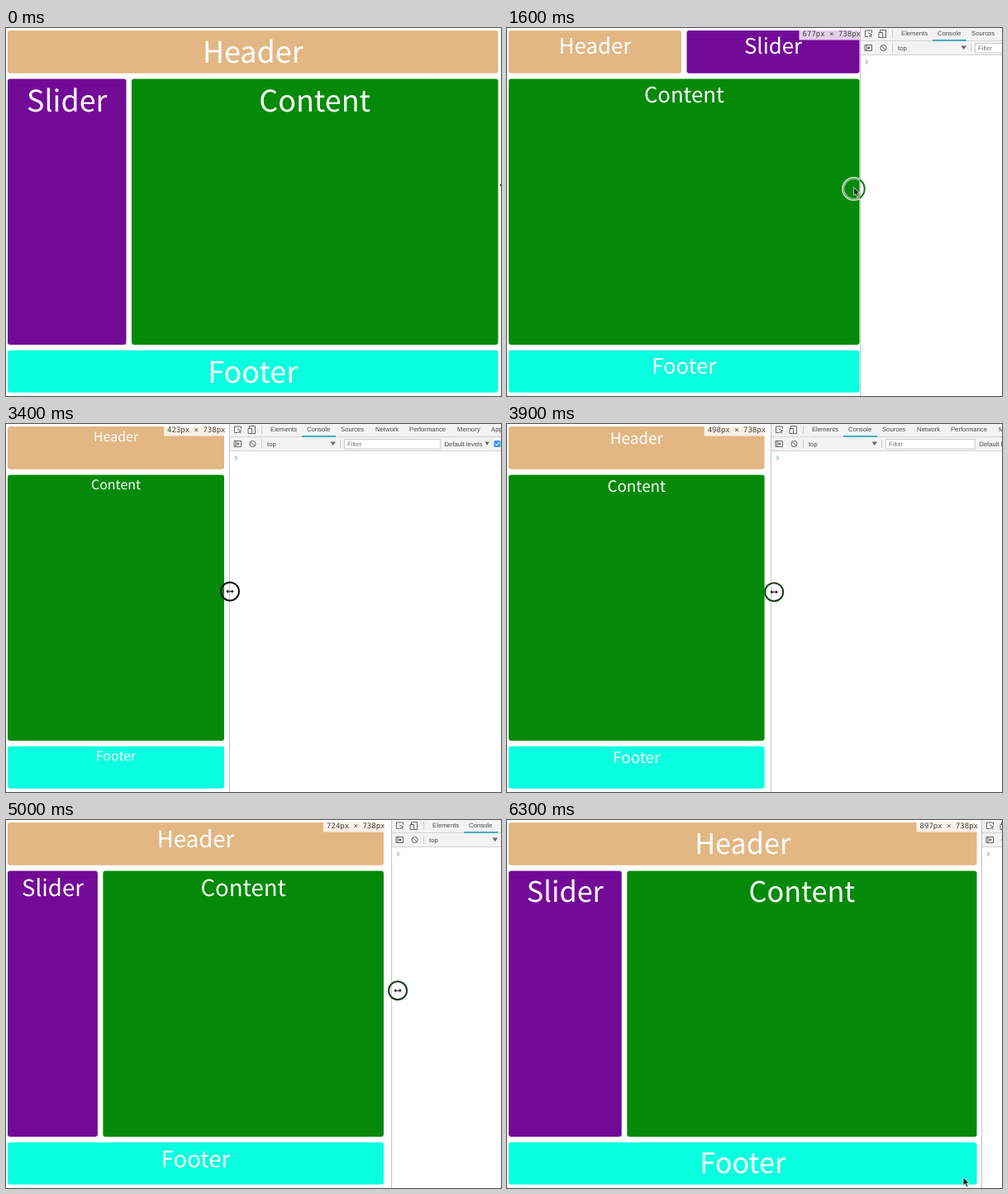
These frames come from a looping animation (599 by 445 pixels, 6.4 s). An HTML page:

```html
<!DOCTYPE html>
<html lang="en">
<head>
<meta charset="utf-8">
<title>Responsive layout</title>
<style>
  html, body { margin: 0; width: 100%; height: 100%; overflow: hidden; background: #fff; }
  svg { display: block; }
  text { text-rendering: geometricPrecision; white-space: pre; }
  .box text { font-family: "Noto Sans CJK SC", "Noto Sans CJK JP", "Noto Sans", sans-serif; fill: #fff; text-anchor: middle; }
  #size text { font: 9px "DejaVu Sans Mono", monospace; fill: #444; text-anchor: end; }
  #tools text { font: 7.7px "Liberation Sans", Arial, sans-serif; fill: #4a4a4a; }
  .line { fill: none; stroke: #666; stroke-width: 1; }
  .sep { stroke: #ccc; stroke-width: 1; }
  .ring { fill: none; }
</style>
</head>
<body>
<svg id="stage" width="599" height="445" viewBox="0 0 599 445">
  <g id="page"></g>
  <g id="size">
    <rect x="-75.5" width="75.5" height="14.5" fill="#fff" fill-opacity=".8"/>
    <text x="-1" y="10"></text>
  </g>
  <g id="pageRing">
    <circle class="ring" id="halo"/>
    <circle class="ring" id="core" r="12.7" stroke="#4c9a50"/>
  </g>
  <svg id="tools" width="599" height="445">
    <rect width="599" height="445" fill="#fff"/>
    <rect width="599" height="32.5" fill="#f3f3f3"/>
    <path d="M0 15.5H599M0 32.5H599" stroke="#d4d4d4"/>
    <path d="M.5 0V445" stroke="#c4c4c4"/>
    <path class="sep" d="M39.5 2V12M39.5 19V29M134.5 19V29"/>
    <path class="line" d="M10 10.5H6.500V3H14.500V6M10 6L15 8.500L12.500 9L14 11.500M12.500 9L11 11Z"/>
    <path class="line" d="M24.500 5V2.500H31.500V11.500H28M23 5.500H27.500V11.500H23Z"/>
    <path class="line" d="M6 20.500H14.500V27.500H6ZM8 20.500V27.500"/>
    <path d="M9.500 22L13 24L9.500 26Z" fill="#666"/>
    <g class="line"><circle cx="28.500" cy="24" r="3.600"/><path d="M26 21.500L31 26.500"/></g>
    <rect x="88" y="14" width="41" height="1.800" fill="#35a9b4"/>
    <g id="tabs"></g>
    <text x="46" y="26.500">top</text>
    <path d="M122.500 21.500H129L125.700 26Z" fill="#666"/>
    <rect id="field" x="139.500" y="18.500" height="11.500" fill="#fff" stroke="#ccc"/>
    <text x="143" y="27" style="fill:#777">Filter</text>
    <g id="levels">
      <text y="26.500">Default levels</text>
      <path d="M49 21.500H54.500L51.700 26Z" fill="#666"/>
      <rect x="60" y="20" width="8" height="8" rx="1.500" fill="#3b99fc"/>
      <path d="M62 24L63.500 26L66.500 21.500" fill="none" stroke="#fff"/>
      <text x="71" y="26.500">Group similar</text>
    </g>
    <path id="prompt" d="M7 38.500L9.500 41L7 43.500" fill="none"/>
    <circle class="ring" id="toolRing"/>
  </svg>
  <g id="cursor">
    <path id="arrow" d="M0-2V8L2.300 6L4 9.800L5.800 9L4.200 5.300H7.200Z" fill="#14260f" stroke="#d8e4d6" stroke-width=".9"/>
    <path id="resize" d="M-5 0L-2-2.800V-.9H2V-2.800L5 0L2 2.800V.9H-2V2.800Z" fill="#1a1a1a" stroke="#fff" stroke-width=".5"/>
  </g>
</svg>
<script>
const LOOP = 6400, STEP = 100;
const EDGE = 2, GAP = 6.5, PAD = 2.5;
const $ = id => document.getElementById(id);

// time, divider x, page width, shown width, pointer x, pointer y
const KEYS = [
  [0,    604,   598,   949, 602,   190],
  [200,  600,   598,   949, 602,   190],
  [1600, 427,   429,   677, 419.7, 194.5],
  [2600, 299.5, 296,   469, 295.7, 199],
  [3100, 264,   261,   414, 264,   202],
  [3400, 270,   266.5, 423, 271,   202.5],
  [4400, 390,   384,   607, 397,   204],
  [5600, 540,   533.5, 839, 548,   209],
  [5900, 572,   566,   890, 580,   210],
  [6300, 574,   571,   897, 552,   434]
];

function el(parent, tag, attrs = {}) {
  const node = document.createElementNS('http://www.w3.org/2000/svg', tag);
  set(node, attrs);
  return parent.appendChild(node);
}
function set(node, attrs) {
  for (const k in attrs) node.setAttribute(k, attrs[k]);
}
function show(node, on) {
  node.style.display = on ? '' : 'none';
}

function makeBox(name, fill, y, height) {
  const g = el($('page'), 'g', { class: 'box' });
  const rect = el(g, 'rect', { fill, y, height, rx: 3 });
  const text = el(g, 'text');
  text.textContent = name;
  return { g, rect, text };
}
const header = makeBox('Header', '#e2b783', 3, 51.7);
const slider = makeBox('Slider', '#730a97', 61.5, 321.5);
const content = makeBox('Content', '#048a08', 61.5, 321.5);
const footer = makeBox('Footer', '#08ffdf', 389.7, 51);

function place(box, x, width, size) {
  const top = +box.rect.getAttribute('y');
  set(box.rect, { x, width });
  set(box.text, { x: x + width / 2, y: top + size * 1.1, 'font-size': size });
}

const TABS = [['Elements', 50], ['Console', 94], ['Sources', 135], ['Network', 177],
  ['Performance', 218], ['Memory', 276], ['Application', 317]];
for (const [name, x] of TABS) {
  el($('tabs'), 'text', { x, y: 9.3 }).textContent = name;
}

// Monotone cubic through the keys
function slope(i, c) {
  const a = KEYS[i - 1], b = KEYS[i], d = KEYS[i + 1];
  if (!a || !d) return 0;
  const l = (b[c] - a[c]) / (b[0] - a[0]), r = (d[c] - b[c]) / (d[0] - b[0]);
  return l * r > 0 ? 2 * l * r / (l + r) : 0;
}
function at(t, c) {
  let i = 0;
  while (i < KEYS.length - 2 && KEYS[i + 1][0] < t) i++;
  const a = KEYS[i], b = KEYS[i + 1], h = b[0] - a[0];
  const u = Math.min(1, (t - a[0]) / h), v = 1 - u;
  return a[c] * v * v * (1 + 2 * u) + b[c] * u * u * (3 - 2 * u)
    + h * u * v * (slope(i, c) * v - slope(i + 1, c) * u);
}

function layout(w, px) {
  const size = w * 0.06, inner = w - EDGE - PAD;
  const half = (inner - GAP) / 2, quarter = (inner - 3 * GAP) / 4;
  const wide = px >= 700, medium = px >= 500 && !wide;
  const rest = EDGE + quarter + GAP;
  show(slider.g, wide || medium);
  set(slider.rect, medium ? { y: 3, height: 51.7 } : { y: 61.5, height: 321.5 });
  place(header, EDGE, medium ? half : inner, size);
  place(slider, medium ? EDGE + half + GAP : EDGE, medium ? half : quarter, size);
  place(content, wide ? rest : EDGE, wide ? inner - quarter - GAP : inner, size);
  place(footer, EDGE, inner, size);
}

function draw(t) {
  const [div, w, px, x, y] = [1, 2, 3, 4, 5].map(c => at(t, c));
  const held = t >= 200 && t < 5900;
  const pulling = t >= 200 && t < 3000;
  const pointing = pulling || t >= 5900;
  layout(w, px);

  show($('size'), t >= 200);
  set($('size'), { transform: `translate(${w})` });
  $('size').lastElementChild.textContent = `${Math.round(px)}px × 738px`;

  const field = 111 + (299.5 - div) / 6;
  set($('tools'), { x: div });
  set($('field'), { width: Math.max(60, field) });
  set($('levels'), { transform: `translate(${field + 144.5})` });
  set($('prompt'), { stroke: t >= 3100 && t < 5000 ? '#4a86e0' : '#777' });

  show($('pageRing'), held);
  show($('toolRing'), held);
  show($('core'), pulling);
  const r = pulling ? 13 : 11;
  const dark = div > 300 ? '#1c3f20' : '#111';
  set($('pageRing'), { transform: `translate(${x} ${y})` });
  set($('halo'), { r, stroke: pulling ? '#d3ddd2' : dark, 'stroke-width': pulling ? 3.2 : 2 });
  set($('toolRing'), { cx: x - div, cy: y, r, stroke: pulling ? '#0b7a18' : dark, 'stroke-width': 2 });

  set($('cursor'), { transform: `translate(${x} ${y})` });
  show($('arrow'), pointing);
  show($('resize'), !pointing);
}

function tick() {
  const t = performance.now() % LOOP;
  draw(Math.floor(t / STEP) * STEP);
  requestAnimationFrame(tick);
}
tick();
</script>
</body>
</html>
```
